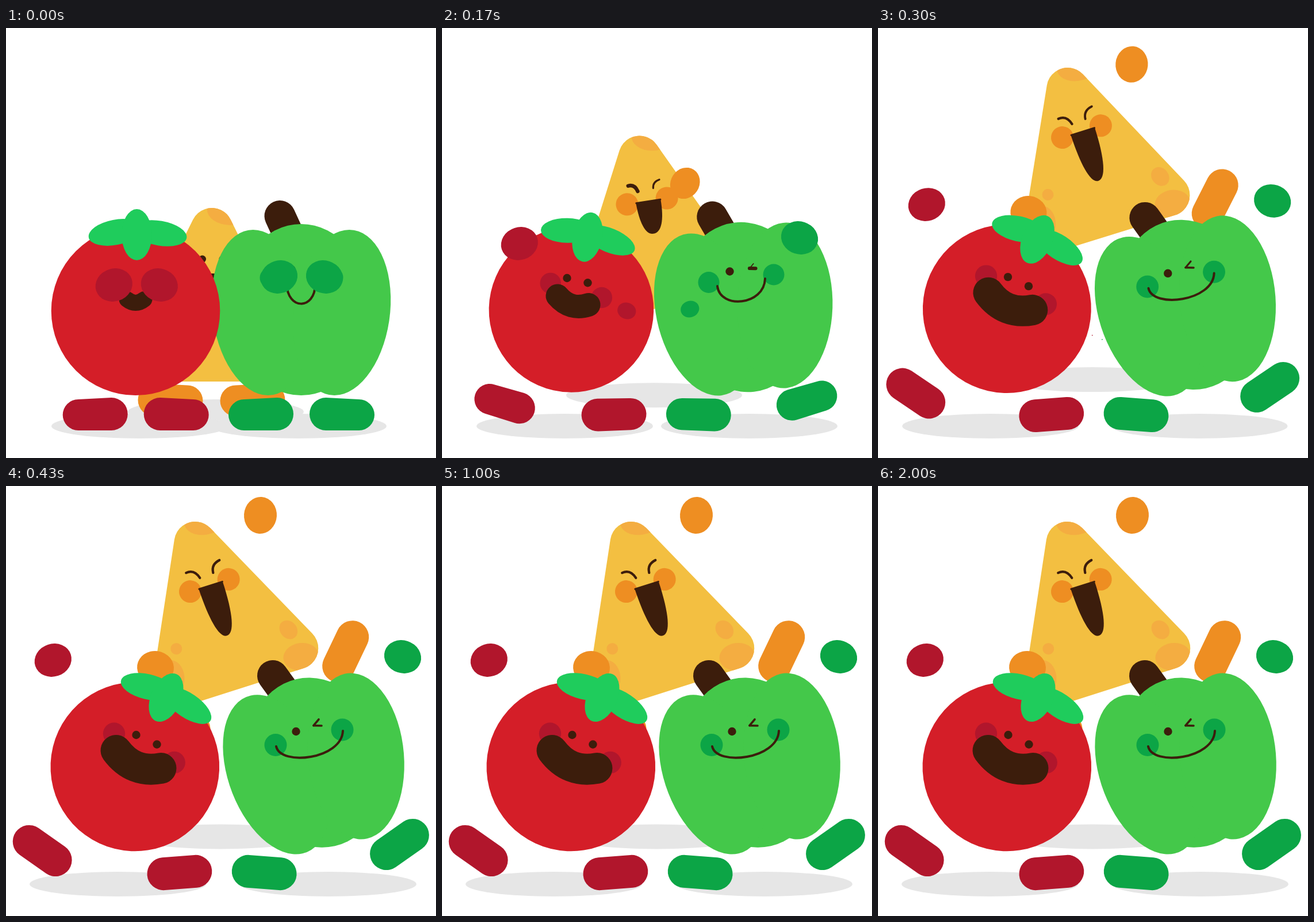
An HTML page with a canvas for the animation above (2030 ms loop, 748 by 748 pixels).

```html
<!DOCTYPE html>
<html lang="en">
<head>
<meta charset="utf-8">
<title>Jumping snacks</title>
<style>
html, body { margin: 0; width: 100%; height: 100%; overflow: hidden; background: #fff; }
canvas { display: block; width: 748px; height: 748px; }
</style>
</head>
<body>
<canvas id="stage" width="748" height="748"></canvas>
<script>
const ctx = document.getElementById('stage').getContext('2d');
const LOOP = 2030, JUMP_FRAMES = 10, RAD = Math.PI / 180, TAU = Math.PI * 2;
const RED = '#d41e28', DARK_RED = '#b1162c', LEAF = '#1fcc5c';
const GREEN = '#44c84a', DARK_GREEN = '#0ca546';
const CORN = '#f3bf41', SPOT = '#f4ad41', ORANGE = '#ee8e22';
const BROWN = '#3c1d0c', SHADE = '#e6e6e6';

let p = 0;    // 0 = crouched, 1 = in the air
let open = 0; // how far the dot eyes have spread into lines

const mix = (a, b, k = p) => a + (b - a) * k;
const mixAll = (a, b, k = p) => a.map((v, i) => mix(v, b[i], k));

// Blend two poses [x, y, degrees] point by point, so turning shapes shrink a little midway
function pose(a, b, draw) {
  const c = mix(Math.cos(a[2] * RAD), Math.cos(b[2] * RAD));
  const s = mix(Math.sin(a[2] * RAD), Math.sin(b[2] * RAD));
  ctx.save();
  ctx.transform(c, s, -s, c, mix(a[0], b[0]), mix(a[1], b[1]));
  draw();
  ctx.restore();
}

function oval(color, x, y, rx, ry = rx, deg = 0) {
  ctx.fillStyle = color;
  ctx.beginPath();
  ctx.ellipse(x, y, rx, ry, deg * RAD, 0, TAU);
  ctx.fill();
}

function moving(color, a, b, rx, ry = rx, deg = 0) {
  oval(color, mix(a[0], b[0]), mix(a[1], b[1]), rx, ry, deg);
}

function stroke(width, color = BROWN) {
  ctx.lineWidth = width;
  ctx.strokeStyle = color;
  ctx.lineCap = ctx.lineJoin = 'round';
  ctx.stroke();
}

// Straight, quadratic or cubic, by the number of points
function line(width, v) {
  ctx.beginPath();
  ctx.moveTo(v[0], v[1]);
  const rest = v.slice(2);
  if (rest.length === 2) ctx.lineTo(...rest);
  else if (rest.length === 4) ctx.quadraticCurveTo(...rest);
  else ctx.bezierCurveTo(...rest);
  stroke(width);
}

// Eye line width: from a dot to a thin line, thinner still on the way
const lid = (dot, thin, dip = 0) => mix(dot, thin, open) - dip * p * (1 - p);

function shoe(color, side, a, b) {
  const toe = mix(27, 28.5);
  pose(a, b, () => {
    ctx.scale(side, 1);
    ctx.fillStyle = color;
    ctx.beginPath();
    ctx.arc(toe - 56.5, 28.5 - toe, toe, Math.PI / 2, Math.PI * 1.5);
    ctx.arc(28, 0, 28.5, -Math.PI / 2, Math.PI / 2);
    ctx.fill();
  });
}

// Outer limbs fly off to the side `out`, the inner hand shrinks away
function limbs(color, out, foot, hand, kick, wave, tuck) {
  const y = 671.5, outer = foot + out * 70.5, inner = foot - out * 70.5;
  shoe(color, -out, [outer, y, 0], [outer + kick[0], y + kick[1], -out * 35]);
  shoe(color, out, [inner, y, 0], [inner + 5.7, y + 1, out * 4.5]);

  const size = 1 - p, [x, hy] = hand;
  oval(color, x + out * 39.5 + wave[0] * p, hy + wave[1] * p, 32.5, 28.5, out * 18);
  oval(color, x - out * 39.5 + tuck[0] * p, hy + tuck[1] * p, 32.5 * size, 28.5 * size, -out * 18);
}

function shadows() {
  moving(SHADE, [365, 667.5], [373, 610], 153, 21.5);
  moving(SHADE, [232.5, 692.5], [194.5, 692.5], 153.5, 21.5);
  moving(SHADE, [508.5, 692.5], [560.5, 692.5], 153.5, 21.5);
}

function nacho() {
  const half = 113.5, tall = 229, round = 36.5, lean = Math.atan(half / tall);
  shoe(ORANGE, -1, [286, 647, 0], [300, 430, -15]);
  shoe(ORANGE, 1, [429, 647, 0], [590.7, 288, -64.5]);
  ctx.save();
  ctx.translate(mix(358, 329), mix(349.5, 98.5));
  ctx.rotate(-17.7 * p * RAD);

  ctx.save();
  ctx.beginPath();
  ctx.arc(0, 0, round, Math.PI + lean, -lean);
  ctx.arc(half, tall, round, -lean, Math.PI / 2);
  ctx.arc(-half, tall, round, Math.PI / 2, Math.PI + lean);
  ctx.fillStyle = CORN;
  ctx.fill();
  ctx.clip();
  oval(SPOT, 32, -34.5, 40.5, 28);
  oval(SPOT, 108.6, 193.7, 14.5, 17.5, -22);
  oval(SPOT, 115.3, 245.2, 31, 24, 10);
  oval(SPOT, -87.3, 166, 10);
  oval(SPOT, -108.8, 210.4, 21, 29, 10);
  ctx.restore();

  oval(ORANGE, -34, 78.5, 19.5);
  oval(ORANGE, 36, 78.5, 19.5);

  const depth = mix(22, 92);
  ctx.fillStyle = BROWN;
  ctx.beginPath();
  ctx.moveTo(-18.5, 79);
  ctx.bezierCurveTo(-17.5, 79 + depth * 0.65, -9.5, 79 + depth, 3.5, 79 + depth);
  ctx.bezierCurveTo(17.5, 79 + depth, 25.5, 79 + depth * 0.65, 25, 79);
  ctx.fill();
  line(3, [-18, 79, 24.5, 79]);

  const eye = (x, width, lash) =>
    line(width, mixAll([x, 52.5, x, 52.5, x, 52.5], lash, open));
  eye(-16.5, lid(13, 4.2), [-31, 45.3, -15.5, 43.4, -10.8, 61.1]);
  eye(19, lid(13, 4.2, 13), [31, 41.9, 15, 44.3, 13.9, 59.5]);
  ctx.restore();

  pose([329, 487, -58], [260, 316, 0], () => oval(ORANGE, 0, 0, 32, 29, 8));
  pose([403, 489, 58], [442.5, 51, 0], () => oval(ORANGE, 0, 0, 28.5, 32, 4));
}

function pepper() {
  line(54, mixAll([476.5, 327, 510, 400], [464, 330, 511, 395]));
  pose([513.5, 494, 0], [539.5, 485, -13], () => {
    oval(GREEN, 0, -4, 120, 149);
    for (const side of [-1, 1]) {
      ctx.save();
      ctx.transform(84, 0, -13 * side, 144, 70.75 * side, 1);
      oval(GREEN, 0, 0, 1);
      ctx.restore();
    }
  });

  const cheek = mix(17.5, 19.5);
  moving(DARK_GREEN, [459, 434.5], [469, 450.5], cheek);
  moving(DARK_GREEN, [569, 434], [585, 424], cheek);
  line(4, mixAll([488, 445, 490, 491, 537, 491, 538, 446],
    [470, 453, 478, 488, 584, 475, 586, 426]));

  moving(BROWN, [496.5, 420], [504.5, 427], 7.2);
  const [ax, ay, bx, by, cx, cy] =
    mixAll([535, 422, 535, 422, 535, 422], [544, 406, 535, 416.7, 549, 417], open);
  line(lid(14, 3.6, 18), [ax, ay, bx, by]);
  line(lid(14, 3.6), [bx, by, cx, cy]);

  limbs(DARK_GREEN, 1, 514, [514.5, 433], [100, -48], [136, -136], [-87.5, 112]);
}

function tomato() {
  pose([225.5, 492, 0], [224.3, 488.3, 25], () => oval(RED, 0, 0, 146.8, 147));
  pose([227.5, 359.5, 0], [278.5, 368, 24], () => {
    oval(LEAF, -37.5, -4, 47, 22, -11);
    oval(LEAF, 40, -2.5, 47.5, 21.5, 10);
    oval(LEAF, 0, 0, 26.3, 44.5);
  });

  const cheek = mix(17.3, 19.2);
  moving(DARK_RED, [189.5, 457], [188, 430.8], cheek);
  moving(DARK_RED, [263, 457], [292.7, 481], cheek);
  line(mix(28, 54), mixAll([210.5, 472, 225.5, 484, 240.5, 472], [191.5, 460, 221, 500, 269.5, 491]));
  moving(BROWN, [208.5, 437], [226.5, 433], 7.2);
  moving(BROWN, [244.5, 437], [262.5, 449.5], 7.2);

  limbs(DARK_RED, -1, 225.7, [227.3, 447], [-92, -37], [-106, -144], [109, 90]);
}

function draw(t) {
  // Thirty steps a second, on starts of 0, 30 and 70 ms
  const rest = t % 100;
  const step = Math.floor(t / 100) * 3 + (rest < 30 ? 0 : rest < 70 ? 1 : 2);
  const u = Math.min(1, step / JUMP_FRAMES);
  p = u * u * (3 - 2 * u);
  open = 1 - (1 - p) ** 2;
  ctx.fillStyle = '#fff';
  ctx.fillRect(0, 0, 748, 748);
  shadows();
  nacho();
  pepper();
  tomato();
}

let start;
function tick(now) {
  start ??= now;
  draw(Math.max(0, now - start) % LOOP);
  requestAnimationFrame(tick);
}
draw(0);
requestAnimationFrame(tick);
</script>
</body>
</html>
```
